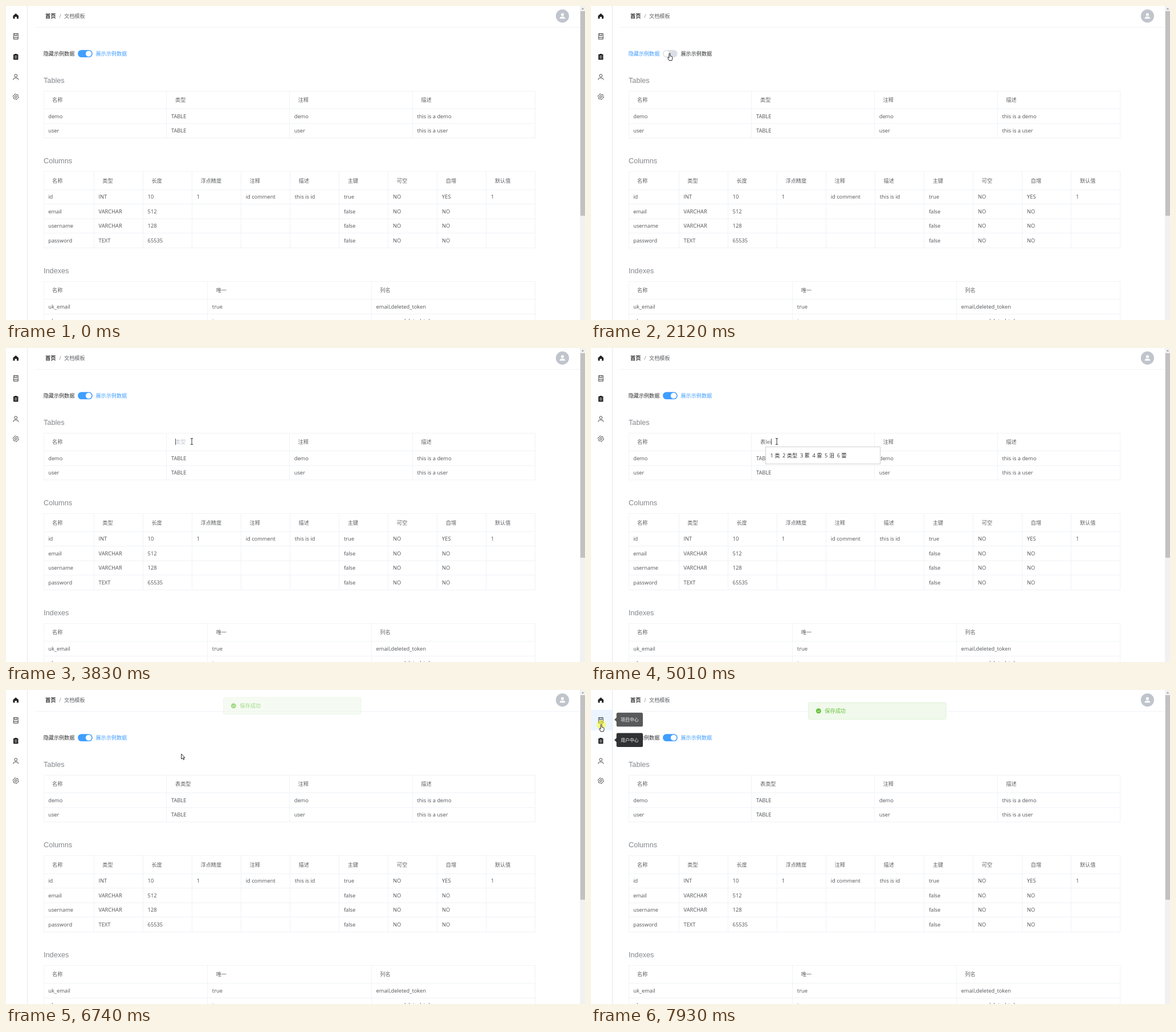
Animation of 1016 by 551 pixels, one loop 8 s. Source, as an HTML page:

```html
<!DOCTYPE html>
<html lang="zh">
<head>
<meta charset="utf-8">
<style>
html, body { margin: 0; width: 100%; height: 100%; overflow: hidden; background: #fff; }
svg { display: block; width: 1016px; height: 551px; }
text { font: 9.2px "Open Sans", "Noto Sans CJK SC", "Noto Sans CJK", sans-serif; fill: #606266; white-space: pre; }
.cell { font-size: 9.3px; fill: #505256; }
.title { font: 12.7px "Liberation Sans", Arial, sans-serif; fill: #84878c; }
.tip { font-size: 7.8px; fill: #fff; }
.grid { stroke: #f0f2f7; fill: none; shape-rendering: crispEdges; }
.icon { stroke: #303133; fill: none; stroke-width: .9; }
.solid { fill: #222; fill-rule: evenodd; }
</style>
</head>
<body>
<svg id="stage" viewBox="0 0 1016 551" xmlns="http://www.w3.org/2000/svg"></svg>
<script>
const LOOP = 8000;
const stage = document.getElementById('stage');

function add(parent, tag, attrs = {}, text) {
  const el = document.createElementNS('http://www.w3.org/2000/svg', tag);
  set(el, attrs);
  if (text !== undefined) el.textContent = text;
  parent.appendChild(el);
  return el;
}
function set(el, attrs) {
  for (const k in attrs) el.setAttribute(k, attrs[k]);
}
const group = (parent = stage) => add(parent, 'g');
const rect = (p, x, y, width, height, fill, more) =>
  add(p, 'rect', { x, y, width, height, fill, ...more });
const path = (p, d, more) => add(p, 'path', { d, ...more });
// Text placed by the middle of its line
const label = (p, x, mid, s, more) => add(p, 'text', { x, y: mid + 3.4, ...more }, s);
const show = (el, on) => el.setAttribute('visibility', on ? 'visible' : 'hidden');

const clamp = v => Math.max(0, Math.min(1, v));
const ramp = (t, start, dur) => clamp((t - start) / dur);
const smooth = u => u * u * (3 - 2 * u);
const mix = (a, b, u) => a + (b - a) * u;
const blend = (a, b, u) => `rgb(${a.map((v, i) => Math.round(mix(v, b[i], u)))})`;
const BLUE = [64, 158, 255], DARK = [48, 49, 51], GREY = [220, 223, 230];

/* ---- tables ---- */
const HEAD = 31.5, ROW = 25.5, EMPTY = 38.3, LEFT = 66, RIGHT = 929;
const sections = [
  { title: 'Tables', heads: '名称,类型,注释,描述',
    rows: ['demo|TABLE|demo|this is a demo', 'user|TABLE|user|this is a user'] },
  { title: 'Columns', first: 88.3,
    heads: '名称,类型,长度,浮点精度,注释,描述,主键,可空,自增,默认值',
    rows: ['id|INT|10|1|id comment|this is id|true|NO|YES|1',
      'email|VARCHAR|512||||false|NO|NO|',
      'username|VARCHAR|128||||false|NO|NO|',
      'password|TEXT|65535||||false|NO|NO|'] },
  { title: 'Indexes', heads: '名称,唯一,列名',
    rows: ['uk_email|true|email,deleted_token', 'uk_username|true|username,deleted_token'] },
  { title: 'Foreign Keys', heads: '外键名,外键表名,外键列名,主键名,主键表名,主键列名,更新规则,删除规则', rows: [] }
];

function drawTables(filled) {
  const g = group();
  let mid = 130;
  for (const { title, heads, rows, first } of sections) {
    if (mid > 560) break;
    const names = heads.split(',');
    const n = names.length;
    const w0 = first || (RIGHT - LEFT) / n;
    const rest = (RIGHT - LEFT - w0) / (n - 1);
    const colX = i => i ? LEFT + w0 + rest * (i - 1) : LEFT;
    const top = mid + 19, body = top + HEAD;
    const snap = v => Math.floor(v) + .5;
    const bottom = body + (filled ? rows.length * ROW : EMPTY);
    let d = '';
    const hline = y => { d += `M${LEFT} ${snap(y)}H${RIGHT}`; };

    add(g, 'text', { x: LEFT, y: mid + 4.6, class: 'title' }, title);
    hline(top);
    hline(body);
    for (let i = 0; i <= n; i++) {
      const outer = i === 0 || i === n;
      d += `M${snap(colX(i) - (i === n ? 1 : 0))} ${top}V${filled || outer ? bottom : body}`;
    }
    names.forEach((s, i) => {
      if (title === 'Tables' && i === 1) return;
      const faint = s === '删除规则' ? { style: 'fill:#c0c4cc' } : {};
      label(g, colX(i) + 15, top + 15.8, s, faint);
    });
    if (filled) {
      rows.forEach((row, r) => {
        const y = body + r * ROW;
        row.split('|').forEach((s, i) => s && label(g, colX(i) + 8.2, y + 12.8, s, { class: 'cell' }));
        hline(y + ROW);
      });
    } else {
      label(g, (LEFT + RIGHT) / 2 + .3, body + 19, 'No Data',
        { 'text-anchor': 'middle', style: 'fill:#909399' });
      hline(bottom);
    }
    path(g, d, { class: 'grid' });
    mid = bottom + 40;
  }
  return g;
}
const full = drawTables(true);
const empty = drawTables(false);

/* ---- editable header cell ---- */
const CELL = 297, EM = 9.2;
const field = label(stage, CELL, 164.8, '类型');
const caret = rect(stage, CELL, 159, 1, 11, '#555');

// time, committed text, text being composed, right edge of the candidate box
const edits = [
  [0, '类型', '', 0], [3500, '类', '', 0], [3630, '', '', 0],
  [4220, '', 'b', 476], [4290, '', 'bi', 476], [4420, '', 'biao', 476],
  [4820, '表', '', 0], [4890, '表', 'l', 508], [5010, '表', 'lei', 508],
  [5140, '表', 'leix', 508], [5280, '表', 'leixing', 538], [5410, '表类型', '', 0]
];
const popup = group();
const popBox = rect(popup, 0, 173.5, 10, 30, '#fff', { stroke: '#d0d0d0' });
const popText = label(popup, 0, 188.5, '', { style: 'fill:#333' });
const words = {
  476: '1 表  2 标  3 彪  4 镖  5 飙  6 膘',
  508: '1 类  2 类型  3 累  4 雷  5 泪  6 蕾',
  538: '1 类型  2 类行  3 雷行  4 累  5 雷  6 泪'
};

/* ---- page frame ---- */
const hover = [35, 70.5].map(y => rect(stage, 0, y, 37, 35.5, '#ecf5ff'));
path(stage, 'M37.5 0V551', { class: 'grid', style: 'stroke:#e6e6e6' });
path(stage, 'M52 37.5H1007', { class: 'grid' });
label(stage, 69, 17.6, '首页', { style: 'fill:#303133;font-weight:700' });
label(stage, 93.3, 17.6, '/', { style: 'fill:#888' });
label(stage, 102, 17.6, '文档模板');

path(stage, 'M17.2 13L22 17.3V22.3H18.9V19H15.5V22.3H12.4V17.3Z', { class: 'solid' });
path(stage, 'M13.3 48.4H21.2V58.2H13.3ZM13.3 55.6H21.2M15.4 48.4V53L17.2 51.7 19 53V48.4', { class: 'icon' });
path(stage, 'M13 85H15V84H19.4V85H21.4V94.3H13ZM15 87.6V88.5H19.4V87.6ZM15 90.5V91.4H19.4V90.5Z', { class: 'solid' });
path(stage, 'M13 129.8V128.7Q13 126.3 15.4 126.3H19Q21.4 126.3 21.4 128.7V129.8', { class: 'icon' });
add(stage, 'circle', { cx: 17.2, cy: 122.2, r: 2.4, class: 'icon' });
let gear = '';
for (let i = 0; i < 24; i++) {
  const a = (i + .5) * Math.PI / 12, r = i % 4 < 2 ? 5 : 4;
  gear += `${i ? 'L' : 'M'}${(17.2 + r * Math.sin(a)).toFixed(2)} ${(159.2 + r * Math.cos(a)).toFixed(2)}`;
}
path(stage, gear + 'Z', { class: 'icon', 'stroke-linejoin': 'round' });
add(stage, 'circle', { cx: 17.2, cy: 159.2, r: 1.8, class: 'icon' });

add(stage, 'circle', { cx: 976.4, cy: 17.6, r: 11.6, fill: '#c0c4cc' });
add(stage, 'circle', { cx: 976.4, cy: 15, r: 2.6, fill: '#fff' });
path(stage, 'M971.5 22.3Q971.5 18.4 976.4 18.4T981.3 22.3Z', { fill: '#fff' });

rect(stage, 1007, 0, 9, 551, '#f1f1f1');
const thumb = rect(stage, 1008, 9, 8, 359, '#c1c1c1');
path(stage, 'M1009.8 5.8L1012 3.4 1014.2 5.8Z', { fill: '#8a8a8a' });

/* ---- switch ---- */
const offLabel = label(stage, 65.7, 83.7, '隐藏示例数据', { style: 'font-size:9.1px' });
const onLabel = label(stage, 157.5, 83.7, '展示示例数据', { style: 'font-size:9.1px' });
const core = rect(stage, 126, 77.2, 25.8, 12.9, '', { rx: 6.45 });
const knob = add(stage, 'circle', { cy: 83.65, r: 5.2, fill: '#fff' });

/* ---- message and tooltips ---- */
const message = group();
rect(message, 381.5, 22, 241.5, 29.5, '#f0f9eb', { rx: 2.5, stroke: '#e1f3d8' });
add(message, 'circle', { cx: 399.3, cy: 36.8, r: 4.5, fill: '#67c23a' });
path(message, 'M397.2 36.9L398.8 38.5 401.5 35.6', { stroke: '#fff', fill: 'none' });
label(message, 410.3, 36.6, '保存成功', { style: 'fill:#67c23a' });

const tips = [['项目中心', 52], ['用户中心', 87.7]].map(([s, y]) => {
  const g = group();
  rect(g, 44.7, y - 12.3, 46.3, 24.6, '#303133', { rx: 2.5 });
  path(g, `M45 ${y - 3.8}L41 ${y}L45 ${y + 3.8}Z`, { fill: '#303133' });
  add(g, 'text', { x: 52.3, y: y + 2.9, class: 'tip' }, s);
  return g;
});

/* ---- pointer ---- */
const pointer = group();
const halo = add(pointer, 'circle', { cx: 0, cy: .5, r: 8, fill: '#ffff00', opacity: .5 });
const outline = { fill: '#fff', stroke: '#111', 'stroke-width': .9, 'stroke-linejoin': 'round' };
const shapes = {
  arrow: path(pointer, 'M0 0V9L2.1 7.1 3.6 10.3 5 9.7 3.6 6.6H6.2Z', outline),
  hand: path(pointer, 'M-1 1Q-1 0 0 0T1 1V4.8L3.9 5.6Q4.9 6 4.9 7.2V9Q4.9 10.6 4 12.5H-1L-3.2 8.5Q-3.8 7.2 -2.6 6.9L-1 8.2Z', outline),
  beam: path(pointer, 'M-2.2 -5.2H2.2M0 -5.2V5.2M-2.2 5.2H2.2', { stroke: '#333', fill: 'none' })
};
const moves = [
  [70, 752, 456], [590, 136, 84], [990, 136, 84], [1060, 138, 83], [2180, 138, 83],
  [2570, 314, 172], [2770, 321, 166], [2899, 321, 166], [2900, 326, 164], [5870, 326, 164],
  [6000, 337, 106], [6140, 337, 106], [6410, 345, 115], [6610, 345, 115],
  [7250, 2, 89], [7400, 2, 89], [7800, 18, 60.3], [LOOP, 18, 60.3]
];
const presses = [[1260, 1340], [2050, 2120], [6000, 6140], [7860, LOOP]];

function place(t) {
  const i = Math.max(1, moves.findIndex(m => m[0] > t));
  const [t0, x0, y0] = moves[i - 1], [t1, x1, y1] = moves[i];
  const u = smooth(ramp(t, t0, t1 - t0));
  return [mix(x0, x1, u), mix(y0, y1, u)];
}
function shapeAt(x, y) {
  if (x < 37 && y > 35) return 'hand';
  if (x > 126 && x < 152 && y > 77 && y < 90) return 'hand';
  return x > 289 && x < 490 && y > 156 && y < 175 ? 'beam' : 'arrow';
}

function drawField(t) {
  const [at, done, typing, edge] = edits.filter(e => e[0] <= t).pop();
  const blank = !done && !typing;
  field.textContent = blank ? '类型' : done + typing;
  field.style.fill = blank ? '#c0c4cc' : '#606266';
  field.style.textDecoration = typing && !done ? 'underline dotted' : '';
  caret.setAttribute('x', Math.round(CELL + (typing ? field.getComputedTextLength() : done.length * EM)));
  const blink = t >= 5410 ? (t - at) % 1060 < 530 : !(t >= 3630 && t < 3830);
  show(caret, t >= 3300 && t < 6000 && blink);
  show(popup, edge > 0);
  if (edge) {
    const x = done ? 306.5 : 297.5;
    set(popBox, { x, width: edge - x - .5 });
    popText.setAttribute('x', x + 8);
    popText.textContent = words[edge];
  }
}

function draw(t) {
  const filled = t < 1350 || t >= 2110;
  show(full, filled);
  show(empty, !filled);
  thumb.setAttribute('height', filled ? 359 : 420);

  const level = dur => smooth(t < 2110 ? 1 - ramp(t, 1350, dur) : ramp(t, 2110, dur));
  const on = level(300), tint = level(200);
  core.setAttribute('fill', blend(GREY, BLUE, on));
  knob.setAttribute('cx', mix(132.6, 145, on));
  offLabel.style.fill = blend(BLUE, DARK, tint);
  onLabel.style.fill = blend(DARK, BLUE, tint);

  drawField(t);

  const drop = 1 - (1 - ramp(t, 6560, 400)) ** 2;
  set(message, { opacity: ramp(t, 6560, 300), transform: `translate(0 ${-30 * (1 - drop)})` });
  hover[0].setAttribute('opacity', ramp(t, 7650, 260));
  hover[1].setAttribute('opacity', ramp(t, 7150, 250) * (1 - ramp(t, 7650, 330)));
  tips[0].setAttribute('opacity', ramp(t, 7690, 300));
  tips[1].setAttribute('opacity', ramp(t, 7170, 300));

  const [x, y] = place(t);
  const kind = shapeAt(x, y);
  pointer.setAttribute('transform', `translate(${x} ${y})`);
  pointer.setAttribute('display', t < 70 ? 'none' : 'inline');
  for (const k in shapes) show(shapes[k], k === kind);
  show(halo, presses.some(([a, b]) => t >= a && t < b));
}

const start = performance.now();
function tick() {
  draw((performance.now() - start) % LOOP);
  requestAnimationFrame(tick);
}
tick();
</script>
</body>
</html>
```
